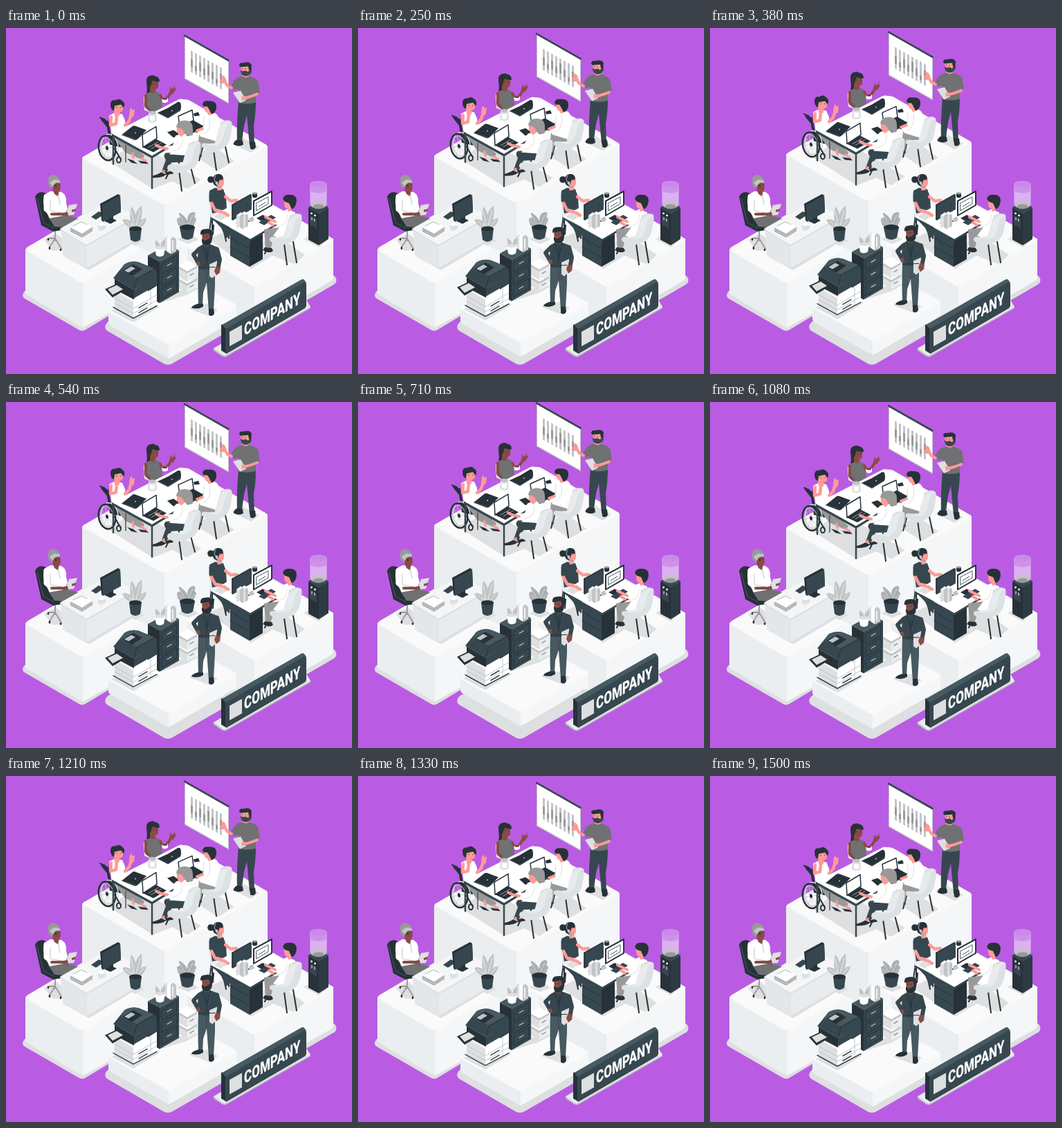
Recreate the animation shown at these times as an HTML page. Size 500 by 500 pixels, loop 1.54 s.

```html
<!DOCTYPE html>
<html lang="en">
<head>
<meta charset="utf-8">
<title>Isometric office</title>
<style>
html, body { margin: 0; width: 100%; height: 100%; overflow: hidden; background: #b95ce3; }
svg { display: block; width: 100%; height: 100%; }
path, ellipse, circle, rect, text { fill: var(--c); }
.line { fill: none; stroke: var(--c); stroke-width: 1.5; stroke-linecap: round; stroke-linejoin: round; }
.dark { --c: #263238; } .navy { --c: #37474f; } .slate { --c: #475961; }
.white { --c: #fff; } .top { --c: #fafafa; } .right { --c: #f4f6f7; } .left { --c: #ebeef0; }
.seat { --c: #dce1e4; } .shell { --c: #e7ebed; }
.pale { --c: #dedfe0; } .silver { --c: #c1c4c6; } .leaf { --c: #acafb1; } .grey { --c: #999; } .steel { --c: #707172; }
.pink { --c: #ff9a97; } .brown { --c: #8b4a44; } .umber { --c: #6f3936; }
text { font: 900 24px Roboto, Inter, sans-serif; }
</style>
</head>
<body>
<svg viewBox="0 0 500 500">
<rect width="500" height="500" style="--c:#b95ce3"/>

<!-- meeting level -->
<g class="lift">
  <path class="left" d="M110 187V330L229 390V248Z"/>
  <path class="right" d="M229 248V390L378 300V170Z"/>
  <path class="top" d="M114 184L253 104Q259 101 265 104L374 167Q381 170 374 173L236 252Q229 256 222 252L114 190Q107 187 114 184Z"/>
  <path class="pale" d="M146 190L190 166L236 192L246 198L282 219L262 232L240 221L212 232ZM272 184L300 170L330 192L306 206ZM326 166L342 158L366 171L354 180Z"/>

  <path class="silver" d="M258 11L322 48V109L258 73Z"/>
  <path class="white" d="M259 12L321 48V107L259 72Z"/>
  <path class="line navy" style="stroke-width:2.600" d="M258 10.500L321.500 46.500"/>
  <g id="bars"></g>

  <!-- presenter -->
  <path class="navy" d="M336 104L361 104Q361 125 358 140L359 168L352 169L348 126L344 141L341 163L334 163Q333 142 336 104Z"/>
  <path class="dark" d="M333 161L342 162L343 168Q337 172 329 168Q328 165 333 161ZM352 164L360 164L361 172Q358 177 353 174Z"/>
  <path class="pink" d="M341 64H351V73H341Z"/>
  <path class="steel" d="M335 71L342 69Q346 73 351 69L359 72Q365 75 365 84L361 92L361 107Q348 111 335 107L336 88L329 89L325 84Q329 74 335 71Z"/>
  <path class="line pink" style="stroke-width:4" d="M326 86L320 83L315 75"/>
  <path class="pink" d="M311 69L312 74L309 73Q308 77 314 80L319 77L317 71L314 68Z"/>
  <path class="line steel" style="stroke-width:7" d="M361 78L363 91"/>
  <path class="line pink" style="stroke-width:4" d="M363 95L355 98L345 101"/>
  <path class="pale" d="M328 93L339 90L347 104L338 108Z"/>
  <path class="pink" d="M340 98L347 98L347 103L341 104Z"/>
  <path class="pink" d="M339 54H352V65Q346 70 340 65Z"/>
  <path class="navy" d="M339 60L342 62L346 61L350 63L354 56L355 63Q351 70 345 69Q339 68 339 60Z"/>
  <path class="dark" d="M337 54Q337 49 343 50Q352 47 355 53L354 61L351 60L350 55L339 56Z"/>
  <path class="line dark" style="stroke-width:1" d="M341.500 58V58.500M346 58.500V59"/>

  <!-- woman with mug -->
  <path class="shell" d="M199 100Q201 95 206 97L212 123L200 118Z"/>
  <path class="dark" d="M203 74Q205 67 214 68L218 76L210 93L203 94Q205 86 203 74Z"/>
  <path class="brown" d="M208 86H216V96H208Z"/>
  <path class="steel" d="M202 95L208 92Q213 96 217 91L224 95L226 116L210 122L201 115Z"/>
  <path class="line brown" style="stroke-width:4" d="M202 97L202 112L207 117M223 97L228 106L235 98L239 91"/>
  <path class="brown" d="M236 92L238 84L240 88L245 82L243 87L247 86L241 95Z"/>
  <path class="brown" d="M207 77Q212 74 220 76V85Q215 92 208 87Z"/>
  <path class="dark" d="M203 76Q206 67 214 69Q222 69 222 77Q216 78 212 75L209 84L204 89Z"/>
  <path class="line dark" style="stroke-width:1" d="M213 80V80.500M218 80V80.500"/>

  <!-- wheelchair user -->
  <path class="dark" d="M138 130L148 134L152 155L166 164V172L150 168L146 143L137 132Z"/>
  <path class="white" d="M149 126L157 122L168 124L172 133L172 153L153 156Z"/>
  <path class="line pink" style="stroke-width:4.500" d="M152 128L151 140L159 138L160 126M172 140L178 134L181 124"/>
  <path class="pink" d="M178 125L179 117L182 114L182 118L186 117L185 126L181 130ZM156 117H164V127H157Z"/>
  <path class="pink" d="M154 109H169V118Q164 125 156 119Z"/>
  <path class="dark" d="M151 109Q152 103 158 104Q164 100 168 105Q173 108 170 115L166 110L157 112L156 119Q151 118 151 109Z"/>
  <path class="line dark" style="stroke-width:1" d="M160 114V114.500M166 114V114.500"/>
  <path class="grey" d="M158 160L178 165L200 184L197 190L172 179Z"/>
  <path class="line pink" style="stroke-width:3.500" d="M183 181L184 187M196 188L202 192"/>
  <path class="dark" d="M175 188L184 191L190 196L181 194ZM191 191L203 193L206 196L195 195Z"/>
  <ellipse class="line pale" cx="150" cy="171" rx="12" ry="18" transform="rotate(-10 150 171)"/>
  <g transform="rotate(-10 146 173)">
    <ellipse class="line dark" style="stroke-width:2.500" cx="146" cy="173" rx="12" ry="18"/>
    <ellipse class="line silver" style="stroke-width:1" cx="146" cy="173" rx="9.500" ry="15"/>
    <path class="line silver" style="stroke-width:.7" d="M137 173H155M146 158V188M140 161L152 185M152 161L140 185"/>
    <ellipse class="dark" cx="146" cy="173" rx="2" ry="3"/>
  </g>
  <path class="line dark" style="stroke-width:2" d="M157 174L165 188M136 129L143 132"/>
  <ellipse class="line dark" style="stroke-width:2" cx="163" cy="190" rx="3" ry="4"/>

  <!-- table -->
  <path class="line navy" style="stroke-width:2.500" d="M155 156V196M211 188V231M250 176V199"/>
  <path class="line slate" style="stroke-width:1.500" d="M173 169V193"/>
  <path class="navy" d="M153 152L211 184L302 129V132L211 188L153 156Z"/>
  <path class="white" d="M153 152L249 103Q253 101 257 103L302 129L211 184Z"/>
  <path class="silver" d="M169 155L187 162L202 153L185 146Z"/>
  <path class="dark" d="M167 154L182 142Q184 140 187 141L203 147L190 160Q188 162 185 161Z"/>
  <path class="dark" d="M219 122L234 130L252 119Q254 114 252 107L249 106L234 115Z"/>
  <path class="line slate" style="stroke-width:.8" d="M219 122L234 129L252 118M168 154L187 160"/>
  <circle class="silver" cx="187" cy="151" r="1"/><circle class="silver" cx="240" cy="119" r="1"/>
  <path class="pale" d="M206 122L217 121L218 134Q212 139 205 134Z"/>
  <path class="white" d="M208 126Q212 128 215 126V133Q211 135 208 133Z"/>
  <ellipse class="silver" cx="211.500" cy="122" rx="5" ry="2.500"/>
  <path class="white" d="M225 102L234 101V106Q230 109 226 107Z"/>
  <ellipse class="umber" cx="229.500" cy="102" rx="3.500" ry="1.300"/>
  <path class="dark" d="M198 172L217 160L232 168L213 179ZM233 150L242 147L251 153L242 158ZM257 142L271 133L285 141L276 151ZM271 123L278 121L280 126L272 127Z"/>
  <path class="line dark" style="stroke-width:1.500;fill:#fff" d="M197 154L217 142L218 159L198 172ZM249 127L269 118L271 133L251 143Z"/>
  <path class="line silver" style="stroke-width:.8" d="M206 172L220 164M210 174L224 166"/>

  <!-- seated man -->
  <path class="line dark" style="stroke-width:2" d="M300 177L304 205M317 171L322 194M285 170L279 191"/>
  <path class="grey" d="M279 154L303 157L302 170L285 169L281 183L276 181Z"/>
  <path class="line navy" style="stroke-width:4" d="M274 181L281 184"/>
  <path class="white" d="M286 125L293 121L303 123Q310 128 309 145L306 164L280 156L285 141Z"/>
  <path class="line pale" style="stroke-width:1" d="M286 128L285 143L276 147M294 129Q297 146 286 153"/>
  <path class="line pink" style="stroke-width:4" d="M284 145L276 148"/>
  <path class="pink" d="M286 110H300V123L293 126L291 122Q286 121 286 110Z"/>
  <path class="dark" d="M284 110Q285 104 293 105Q305 104 304 115Q303 122 297 124L293 116L291 113L286 113Z"/>
  <path class="seat" d="M310 136Q320 130 326 135Q328 140 324 158Q322 170 311 175L299 180Q289 177 283 171Q281 165 289 166L303 169Q307 151 310 136Z"/>
  <path class="shell" d="M307 145Q313 134 325 135Q317 139 315 154Q313 166 304 170L288 167L302 166Z"/>

  <!-- seated woman -->
  <path class="line dark" style="stroke-width:2" d="M250 206L254 235M267 201L273 224M237 205L231 217"/>
  <path class="navy" d="M231 180L257 179L264 193L239 194L232 209L225 207L231 190Q226 184 231 180Z"/>
  <path class="line pink" style="stroke-width:3.500" d="M228 206L226 211M238 203L236 208"/>
  <path class="dark" d="M212 213Q220 211 224 208L231 211Q228 216 212 216ZM231 208L240 206L242 210L230 212Z"/>
  <path class="white" d="M245 155L256 152L267 158Q272 169 264 184L236 182L243 171Z"/>
  <path class="line white" style="stroke-width:6" d="M248 160L243 172L234 173"/>
  <path class="line pale" style="stroke-width:1" d="M255 160Q257 174 241 178"/>
  <path class="line pink" style="stroke-width:4" d="M233 174L223 172L217 169"/>
  <path class="pink" d="M247 143L257 139L260 151L253 157L249 153Q246 151 247 143Z"/>
  <path class="grey" d="M246 143Q247 133 259 133Q270 134 270 144L270 154Q264 157 259 153L254 145Z"/>
  <path class="seat" d="M264 167Q275 160 281 165Q283 171 278 190Q276 201 264 205L250 209Q238 209 233 203Q232 196 241 196L256 198Q260 181 264 167Z"/>
  <path class="shell" d="M260 177Q267 164 280 165Q272 169 270 183Q268 197 256 199L240 197L255 195Z"/>
</g>

<!-- left platform -->
<path class="pale" d="M27 380L150 410V415L115 436Q110 439 105 436L27 391Q21 387 27 380Z"/>
<path class="left" d="M28 319V381Q28 384 31 386L105 430Q111 433 111 433V362Z"/>
<path class="right" d="M111 362V433L117 430L260 350L194 317Z"/>
<path class="top" d="M32 316L110 270L196 319L117 366Q111 369 105 366L32 323Q26 319 32 316Z"/>
<path class="pale" d="M55 306L72 297L84 306V321L67 322ZM82 329L184 297L198 303L120 350ZM174 306L192 302L200 308L186 315Z"/>

<!-- manager's chair and desk -->
<path class="line grey" style="stroke-width:1.800" d="M71 291V307M71 304L64 315M71 304L80 319M71 304L62 304"/>
<path class="line dark" style="stroke-width:2.500" d="M63 317V319M79 320V321M61 305V306"/>
<path class="dark" d="M42 244Q44 238 52 237L61 240L66 272L85 281L82 292L68 294L51 285Z"/>
<path class="line slate" style="stroke-width:1" d="M45 246L54 281L69 289"/>
<path class="steel" d="M61 273L80 269L104 275Q109 279 105 285L94 289L70 287Z"/>
<path class="white" d="M55 241L64 236L80 237Q88 241 87 253L89 261L84 271L63 275Q56 262 54 252Z"/>
<path class="line white" style="stroke-width:7" d="M58 244L58 262L67 269"/>
<path class="line silver" style="stroke-width:1" d="M64 249L64 264L80 267M75 239L78 255"/>
<path class="line brown" style="stroke-width:4" d="M66 269L84 269"/>
<path class="brown" d="M68 235H77L75 243L70 240Z"/>
<path class="pale" d="M86 271L91 256L103 254L98 270Z"/>
<path class="brown" d="M82 267L89 266L90 271L82 272ZM95 263L101 261L100 265L95 266Z"/>
<path class="brown" d="M65 224L78 222L79 232Q75 239 68 235Z"/>
<path class="grey" d="M61 225Q59 214 67 212Q78 213 78 223Q72 222 69 226L67 232Q62 231 61 225Z"/>
<path class="silver" d="M63 224Q70 216 78 221L78 224Q71 222 68 229Z"/>
<path class="line dark" style="stroke-width:.8" d="M71 227H73V229H71ZM76 226.500H78"/>

<path d="M79 291L116 314V347L82 328Z" style="--c:#e3e7e9"/>
<path d="M116 314L185 275V307L116 347Z" style="--c:#e9ecee"/>
<path class="pale" d="M78 290L116 313L187 273V275L116 316L78 292Z"/>
<path d="M78 290L149 250L187 273L116 313Z" style="--c:#f3f5f6"/>
<path class="line pale" style="stroke-width:1" d="M116 317V347"/>
<path class="navy" d="M123 273L134 265L142 269L130 277Z"/>
<path class="dark" d="M142 279L151 274L160 278L151 283ZM149 266H155V278H149Z"/>
<path class="dark" d="M136 254L162 240L165 242L166 266L140 280L138 278Z"/>
<path class="navy" d="M139 256L165 242L166 266L140 280Z"/>
<path class="silver" d="M93 289L109 279L125 288V293L110 303L93 294Z"/>
<path class="white" d="M93 288L109 278L125 287L110 297Z"/>
<path class="line grey" style="stroke-width:.8" d="M93 290L110 299L125 290M93 293L110 302L125 293M97 286L109 280L117 284"/>
<path class="pale" d="M133 284H142V291Q137 295 133 291Z"/>
<ellipse class="white" cx="137.500" cy="284" rx="4.500" ry="2"/>
<path class="line silver" style="stroke-width:1" d="M142 286Q146 287 142 290"/>

<!-- plant by the desk -->
<path class="silver" d="M186 291Q176 280 181 258Q191 269 188 290ZM186 290Q180 273 168 277Q173 288 185 291ZM187 290Q184 264 196 257Q199 275 188 291ZM188 291Q190 276 203 275Q201 287 189 291Z"/>
<path class="line white" style="stroke-width:.7" d="M186 288L181 265M187 289L194 263M188 290L199 278M185 290L173 279"/>
<path class="navy" d="M178 290H196L194 306Q187 312 180 306Z"/>
<ellipse class="dark" cx="187" cy="290" rx="9" ry="3.500"/>

<!-- right platform -->
<path class="pale" d="M325 400L473 357Q481 363 475 370L370 431Q355 440 325 423Z"/>
<path class="left" d="M262 316L359 368V432L262 380Z"/>
<path class="right" d="M359 368V430L469 366Q473 363 473 360V304Z"/>
<path class="top" d="M262 317L250 309L378 251L470 303Q476 306 470 309L365 371Q359 375 353 371Z"/>
<path class="pale" d="M247 305L268 298L278 306L263 312ZM292 305L320 292L354 326L371 309L395 302L432 328L416 341L385 329L354 348ZM430 305L440 299L466 305L452 317Z"/>

<path class="leaf" d="M261 290Q247 290 247 276L252 273Q248 267 251 267Q259 272 262 279Q262 266 272 266Q275 268 272 273Q277 275 273 282Q270 291 261 290Z"/>
<path class="line pale" style="stroke-width:.8" d="M261 289L251 271M261 289L270 270M261 289L249 279M262 289L273 279"/>
<path class="navy" d="M251 288H273L270 303Q262 309 254 303Z"/>
<ellipse class="dark" cx="262" cy="288" rx="11" ry="4"/>

<!-- headset worker -->
<path class="line dark" style="stroke-width:2" d="M297 270L293 303M300 285L299 298M313 285L318 308M322 290V304"/>
<path class="shell" d="M293 252L306 265L325 272L316 287L297 280Z"/>
<path class="navy" d="M300 277L322 282L326 298L318 304L311 289Z"/>
<path class="navy" d="M294 235L302 231L314 233L318 244L319 263L298 268L296 254Z"/>
<path class="line navy" style="stroke-width:7" d="M297 239L297 249"/>
<path class="line pink" style="stroke-width:4.500" d="M297 253L302 263L316 266M317 244L325 250L333 249"/>
<path class="pink" d="M303 225H312V234L306 235Z"/>
<path class="pink" d="M302 216L315 218V226Q312 231 305 229Z"/>
<circle class="dark" cx="296" cy="219" r="4.800"/>
<path class="dark" d="M299 217Q301 210 308 211Q314 212 314 218Q312 221 309 219L305 229L301 227Q298 223 299 217Z"/>
<path class="line grey" style="stroke-width:1.200" d="M303 213Q299 220 304 224L306 229L312 229"/>
<ellipse class="silver" cx="304.500" cy="224" rx="1.800" ry="2.600"/>

<!-- shared desk -->
<path class="line dark" style="stroke-width:2" d="M298 276V292M409 271V287"/>
<path class="navy" d="M324 290L352 306V345L324 329Z"/>
<path class="dark" d="M352 306L371 295V334L352 345Z"/>
<path class="line dark" style="stroke-width:1" d="M324 303L352 319M324 316L352 332"/>
<path class="navy" d="M296 273L353 305L410 271V274L353 308L296 276Z"/>
<path class="white" d="M296 273L355 240L410 271L353 304Z"/>
<path class="pale" d="M300 272L315 264L325 270L310 278Z"/>
<path class="line pink" style="stroke-width:4" d="M303 264L315 267L321 271"/>
<path class="dark" d="M332 282L344 274L352 279L341 287ZM362 275L371 270L380 275L371 280Z"/>
<path class="navy" d="M326 255L353 240L355 241V262L328 278L326 277Z"/>
<path class="line dark" style="stroke-width:1" d="M328 257V277M327 256L354 241"/>
<path class="line dark" style="stroke-width:2;fill:#fff" d="M358 250L384 236V256L358 271Z"/>
<path class="line slate" style="stroke-width:1" d="M362 253L379 244V254L362 264ZM365 258L375 252"/>
<path class="pale" d="M333 271L338 267V287L333 289ZM343 266L348 269V287L343 290Z"/>
<path class="silver" d="M338 266L343 268V291L338 288ZM346 269L350 270V286L346 289Z"/>
<path class="white" d="M334 270L339 267L342 268L337 272ZM341 267L345 265L349 268L345 270Z"/>
<path class="dark" d="M356 239H363V244Q359 247 356 244Z"/>
<ellipse class="grey" cx="359.500" cy="239" rx="3.500" ry="1.400"/>
<path class="navy" d="M365 281L383 270L390 274L373 285Z"/>
<path class="silver" d="M351 275L357 272L359 278L352 281Z"/>

<!-- typing man -->
<path class="line dark" style="stroke-width:2" d="M402 312L406 342M415 309L420 339M384 305L374 326"/>
<path class="grey" d="M373 291L397 288L407 305L386 307L382 320L375 319Z"/>
<path class="dark" d="M374 317L384 318L386 322Q381 327 371 321Z"/>
<path class="white" d="M397 266L406 262L417 266Q424 275 417 293L402 307L386 300L395 288Z"/>
<path class="line white" style="stroke-width:6" d="M400 270L395 282L389 281"/>
<path class="line pale" style="stroke-width:1" d="M406 271Q407 287 390 287"/>
<path class="line pink" style="stroke-width:4" d="M389 280L381 276L375 273M386 285L380 281"/>
<path class="pink" d="M402 248H415V260L409 266L406 261Q401 260 402 248Z"/>
<path class="dark" d="M400 247Q402 240 409 241Q420 240 420 250Q419 259 413 262L409 253L403 251Z"/>
<path class="seat" d="M409 272Q420 265 427 270Q429 276 424 295Q421 306 411 310L399 314Q386 313 381 307Q380 301 388 302L403 303Q406 287 409 272Z"/>
<path class="shell" d="M406 282Q412 270 426 270Q418 274 416 288Q414 302 403 305L387 303L401 300Z"/>

<!-- water cooler -->
<path d="M439 226Q440 221 451 221Q463 221 464 226V256Q451 266 439 256Z" style="--c:#cf91eb"/>
<path d="M440 236Q451 241 463 236V254Q451 261 440 254Z" style="--c:#dab2ee"/>
<ellipse cx="451.500" cy="226" rx="12" ry="4.500" style="--c:#c98be8"/>
<path class="dark" d="M437 259L452 268V314L437 306Z"/>
<path d="M452 268L466 259V305L452 314Z" style="--c:#2d3b42"/>
<path class="navy" d="M437 259L451 251L466 259L452 268Z"/>
<ellipse class="silver" cx="451.500" cy="256" rx="11" ry="5"/>
<ellipse class="grey" cx="451.500" cy="258" rx="8" ry="3.500"/>
<path class="navy" d="M439 271L449 277V290L439 284Z"/>
<circle class="white" cx="441.500" cy="268" r="1.400"/><circle class="white" cx="446.500" cy="271" r="1.400"/>
<path class="line silver" d="M442 274V277M446 276V279"/>

<!-- front platform: the slab floats over a fixed base -->
<path class="pale" d="M148 424L235 390L333 420Q341 425 334 431L240 485Q234 488 228 485L147 438Q139 432 148 424Z"/>
<g class="lift">
  <path class="left" d="M148 407V425Q148 428 151 430L229 474Q235 477 235 477V451Z"/>
  <path class="right" d="M235 451V477L241 474L330 422Q333 420 333 417V399Z"/>
  <path class="top" d="M152 405L240 355Q246 352 252 355L329 397Q336 400 329 404L241 454Q235 458 229 454L152 411Q145 408 152 405Z"/>
  <path class="pale" d="M152 408L188 396L222 402L184 425ZM220 398L250 379L281 374L262 385ZM264 405L291 398L306 407L294 416Z"/>

  <!-- archive boxes -->
  <path class="pale" d="M249 362L262 369V382L249 375ZM249 344L262 351V366L249 359Z"/>
  <path class="left" d="M262 369L275 361V374L262 382ZM262 351L275 343V358L262 366Z"/>
  <path class="silver" d="M248 361L262 369L276 361V364L262 372L248 364ZM248 343L262 351L276 343V346L262 354L248 346Z"/>
  <path class="white" d="M248 343L262 335L276 343L262 351Z"/>
  <path class="line grey" style="stroke-width:1.500" d="M266 357L271 354M266 374L271 371"/>

  <!-- filing cabinet -->
  <path class="dark" d="M205 328L222 337V397L205 388Z"/>
  <path class="navy" d="M222 337L250 321V381L222 397Z"/>
  <path class="slate" d="M205 328L233 313L250 321L222 337Z"/>
  <path class="line dark" style="stroke-width:1" d="M225 341L247 328V342L225 355ZM225 359L247 346V360L225 373ZM225 377L247 364V378L225 391Z"/>
  <path class="line silver" style="stroke-width:1.200" d="M233 343L239 339.500M233 361L239 357.500M233 379L239 375.500"/>
  <path class="pale" d="M228 303L234 300V323L228 320ZM239 303L246 307V322L239 326Z"/>
  <path class="white" d="M233 301L238 304V326L233 323Z"/>
  <path class="silver" d="M238 304L242 301L246 305V320L238 326Z"/>
  <path class="line white" style="stroke-width:1.500" d="M236 307V319M241 307V321"/>
  <path class="silver" d="M222 320Q214 316 216 306Q223 309 223 319Q223 307 230 305Q232 315 224 320Z"/>
  <path class="white" d="M215 317H230L228 328Q222 332 217 328Z"/>
  <ellipse class="pale" cx="222.500" cy="317" rx="7.500" ry="2.500"/>

  <!-- printer -->
  <path class="pale" d="M157 380L184 395V420L157 405Z"/>
  <path class="white" d="M184 393L218 372V401L184 420Z"/>
  <path class="line silver" style="stroke-width:1" d="M157 390L184 405L218 385M157 397L184 412L218 393M209 379V405"/>
  <path class="line navy" style="stroke-width:1.500" d="M155 403L184 419L218 401M192 404L204 397M192 411L204 404"/>
  <path class="dark" d="M157 362L185 378V392L157 377Z"/>
  <path class="navy" d="M185 378L218 358V371L185 390Z"/>
  <path class="navy" d="M155 361L171 341Q181 335 192 338L214 347Q219 350 218 359L185 378Z"/>
  <path class="slate" d="M171 341Q181 335 192 338L214 347L189 361L166 350Z"/>
  <path class="dark" d="M168 350L184 341L197 348L182 358Z"/>
  <path class="silver" d="M171 350L181 344L187 347L177 353Z"/>
  <path class="line dark" style="stroke-width:1" d="M189 362L214 348M185 378L189 362"/>
  <path class="dark" d="M143 377L160 369L174 377L154 389Z"/>
  <path class="pale" d="M147 377L160 371L169 377L154 385Z"/>

  <!-- standing man -->
  <path class="slate" d="M278 344L302 343L302 371L300 407L293 409L290 367L285 382L284 400L278 400Q277 370 278 344Z"/>
  <path class="line navy" style="stroke-width:1" d="M290 350V367L296 362"/>
  <path class="dark" d="M277 398L285 398L285 402Q278 407 268 404Q268 401 277 398ZM293 405L300 405L301 412Q298 418 293 414Z"/>
  <path class="brown" d="M284 308H295V318H284Z"/>
  <path class="navy" d="M278 316L285 312Q290 317 295 312L305 316L308 331L303 347Q290 351 278 347L277 332Z"/>
  <path class="line navy" style="stroke-width:6" d="M279 319L271 327L278 339"/>
  <path class="brown" d="M275 337L280 337L281 343L276 343Z"/>
  <path class="pale" d="M294 341L305 336L306 354L298 361L294 358Z"/>
  <path class="line navy" style="stroke-width:6" d="M305 319L309 334L307 344"/>
  <path class="brown" d="M303 345L310 345L309 353L304 357L301 351Z"/>
  <path class="line dark" style="stroke-width:1" d="M285 315L290 334M295 314L290 334M290 318V343M279 346L302 345"/>
  <path class="brown" d="M283 295L296 295V306Q291 314 284 308Z"/>
  <path class="dark" d="M281 298Q280 290 288 290Q299 288 299 298L297 309Q293 315 287 313Q282 311 283 304L287 307L292 305L295 302L293 296L283 298Z"/>
  <path class="line dark" style="stroke-width:1" d="M285 300V301M290 300V301"/>
</g>

<!-- sign -->
<path class="silver" d="M300 463L315 454L433 391L440 403V405L318 475Q315 476 312 474L300 466Z"/>
<path d="M300 463L431 389L440 403L318 473Q315 474 312 472Z" style="--c:#e9e9ea"/>
<path class="dark" d="M311 431Q310 429 313 428L319 434V471L311 466Z"/>
<path class="slate" d="M312 429L426 364Q429 362 431 364L434 368L319 436Z"/>
<path class="navy" d="M317 437Q317 435 319 434L430 368Q434 367 434 371V401Q434 403 432 405L320 470Q317 471 317 468Z"/>
<path class="pale" d="M323 439L341 429V450L323 460Z"/>
<text class="white" transform="matrix(.71 -.41 0 1 344 445)">COMPANY</text>
</svg>
<script>
const LOOP = 1540, RISE = 9.3, LEAD = 30, REST = 0.5;
const lifts = document.querySelectorAll('.lift');

// bar chart, sheared with the screen
const split = [19, 13, 21, 16, 24, 18, 11, 22];
document.getElementById('bars').innerHTML = split.map((h, i) => {
  const x = 267 + i * 6, y = 32 + i * 3.4;
  return `<path class="silver" d="M${x} ${y}l3 1.700v31l-3 -1.700z"/>` +
    `<path class="grey" d="M${x} ${y + 31 - h}l3 1.700v${h * 0.6}l-3 -1.700z"/>`;
}).join('');

function draw(now) {
  const phase = 2 * Math.PI * ((now + LEAD) % LOOP) / LOOP;
  const y = REST - RISE * (1 - Math.cos(phase)) / 2;
  for (const g of lifts) g.setAttribute('transform', `translate(0 ${y.toFixed(2)})`);
}

let start;
function tick(now) {
  start ??= now;
  draw(now - start);
  requestAnimationFrame(tick);
}
draw(0);
requestAnimationFrame(tick);
</script>
</body>
</html>
```
